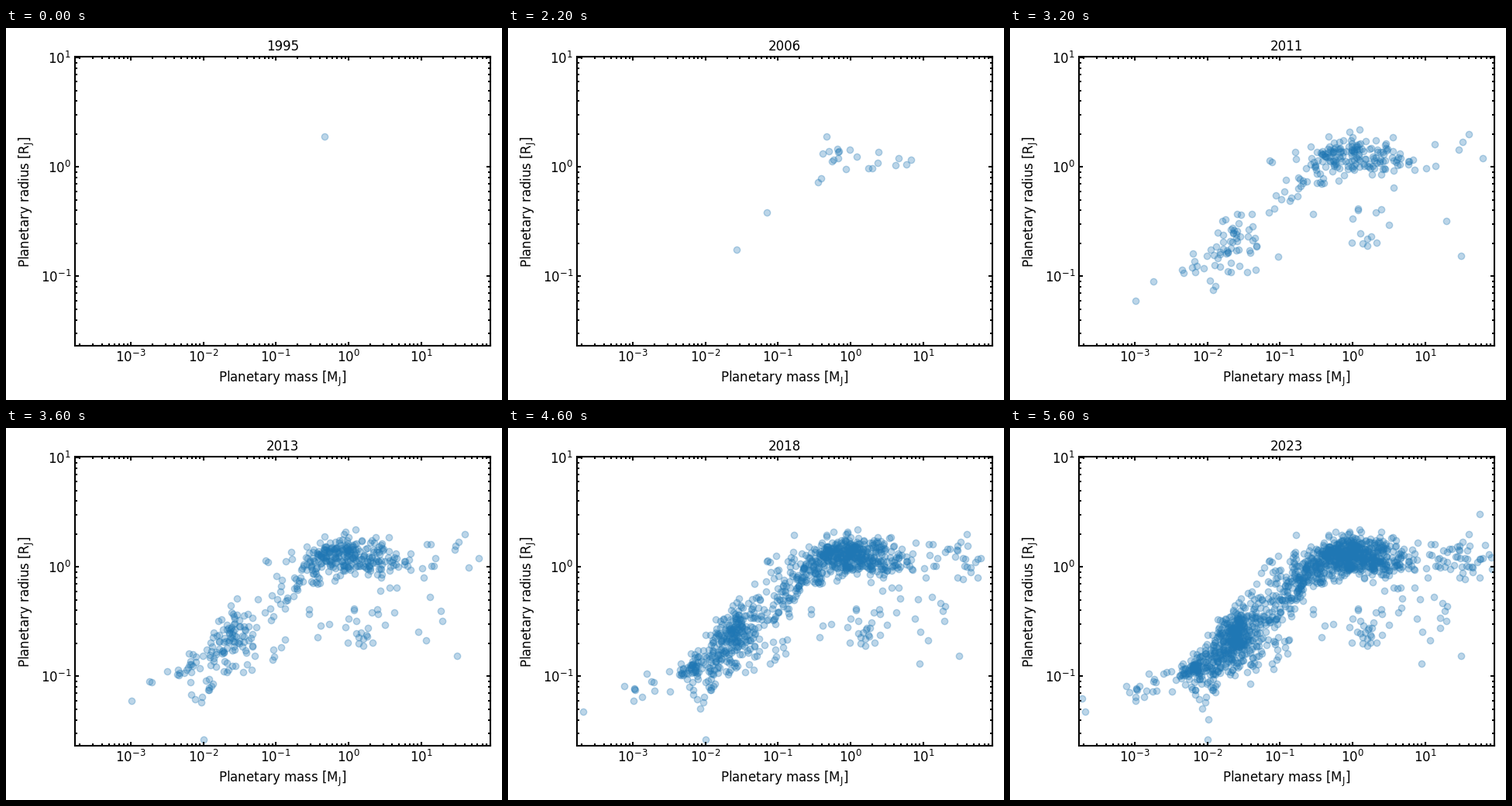
A matplotlib script that plays this animation: 640 by 480 pixels, repeating every 5.8 s.

```python
import numpy as np
import matplotlib.pyplot as plt
from matplotlib.animation import FuncAnimation

W, H, DPI = 640, 480, 100
LEFT, RIGHT, TOP, BOTTOM = 89, 625, 37.4, 410
DEC_X, DEC_Y = 93.65, 141.15       # pixels per decade
ONE_X, ONE_Y = 441.87, 179.2       # where mass = 1 and radius = 1 lie
FIRST, LAST = 1995, 2023

rng = np.random.default_rng(51)


def mass(x):
    return 10 ** ((x - ONE_X) / DEC_X)


def radius(y):
    return 10 ** ((ONE_Y - y) / DEC_Y)


# The first planets and a few extreme ones: year, x, y
LANDMARKS = np.array([
    (1995, 411, 140), (1996, 514, 176), (1999, 427, 159), (2000, 520, 170),
    (2001, 500, 177), (2004, 295, 286), (2004, 334, 238), (2005, 400, 199),
    (2009, 592, 137), (2012, 255, 402), (2016, 97, 366), (2020, 93, 349),
    (2021, 606, 111), (2022, 621, 167)])

# Mass-radius relation through a few knots
RIDGE_X = [95, 165, 215, 255, 290, 325, 355, 385, 415, 440, 500]
RIDGE_Y = [358, 340, 322, 298, 270, 244, 212, 184, 166, 164, 171]

# Share of a population known by the end of a year
GIANT = [2001, 2006, 2009, 2013, 2018, 2023], [0, .028, .12, .44, .73, 1]
SMALL = [2007, 2009, 2013, 2018, 2023], [0, .006, .22, .6, 1]
STRAY = [2009, 2013, 2018, 2023], [0, .65, .82, 1]

# Count, x centre, x spread, offset below the ridge, y spread, discovery
POPULATIONS = [
    (440, 434, 25, -1, 14, GIANT),
    (125, 478, 24, 0, 11, GIANT),
    (110, 386, 17, 0, 13, SMALL),
    (45, 580, 23, 1, 14, SMALL),
    (330, 288, 17, 0, 19, SMALL),
    (170, 338, 24, 6, 32, SMALL),
    (75, 250, 13, 2, 16, SMALL),
    (40, 231, 9, 1, 4, SMALL),
    (22, 190, 22, -1, 9, SMALL),
    (26, 272, 24, 44, 17, STRAY),
    (16, 455, 9, 98, 11, STRAY),
    (40, 500, 48, 65, 30, STRAY),
]


def noise(n):
    z = rng.normal(size=3 * n)
    return z[np.abs(z) < 2.4][:n]


def populate(n, centre, sx, below, sy, discovery):
    known_by, share = discovery
    born = np.ceil(np.interp((np.arange(n) + 0.5) / n, share, known_by))
    x = centre + sx * noise(n)
    y = np.interp(x, RIDGE_X, RIDGE_Y) + below + sy * noise(n)
    return np.column_stack([born, x, y])


catalogue = np.vstack([LANDMARKS] + [populate(*p) for p in POPULATIONS])
catalogue = catalogue[np.argsort(catalogue[:, 0], kind="stable")]
years = catalogue[:, 0]
planets = np.column_stack([mass(catalogue[:, 1]), radius(catalogue[:, 2])])

plt.rcParams["font.family"] = "DejaVu Sans"
fig = plt.figure(figsize=(W / DPI, H / DPI), dpi=DPI, facecolor="white")
ax = fig.add_axes([LEFT / W, 1 - BOTTOM / H,
                   (RIGHT - LEFT) / W, (BOTTOM - TOP) / H])
ax.set_xscale("log")
ax.set_yscale("log")
ax.set_xlim(mass(LEFT), mass(RIGHT))
ax.set_ylim(radius(BOTTOM), radius(TOP))
ax.set_xlabel(r"Planetary mass [M$_\mathrm{J}$]", fontsize=12)
ax.set_ylabel(r"Planetary radius [R$_\mathrm{J}$]", fontsize=12)
ax.tick_params(which="both", direction="in", top=True, right=True,
               width=1.5, labelsize=12)
ax.tick_params(which="minor", labelbottom=False, labelleft=False)
for spine in ax.spines.values():
    spine.set_linewidth(1.5)

dots = ax.scatter([], [], s=36, color="C0", alpha=0.3, linewidths=1)
title = ax.set_title(str(FIRST), fontsize=12)


def draw(i):
    year = FIRST + i
    dots.set_offsets(planets[years <= year])
    title.set_text(str(year))
    return dots, title


anim = FuncAnimation(fig, draw, frames=LAST - FIRST + 1, interval=200,
                     init_func=lambda: draw(0), repeat=True, repeat_delay=0)
plt.show()
```
